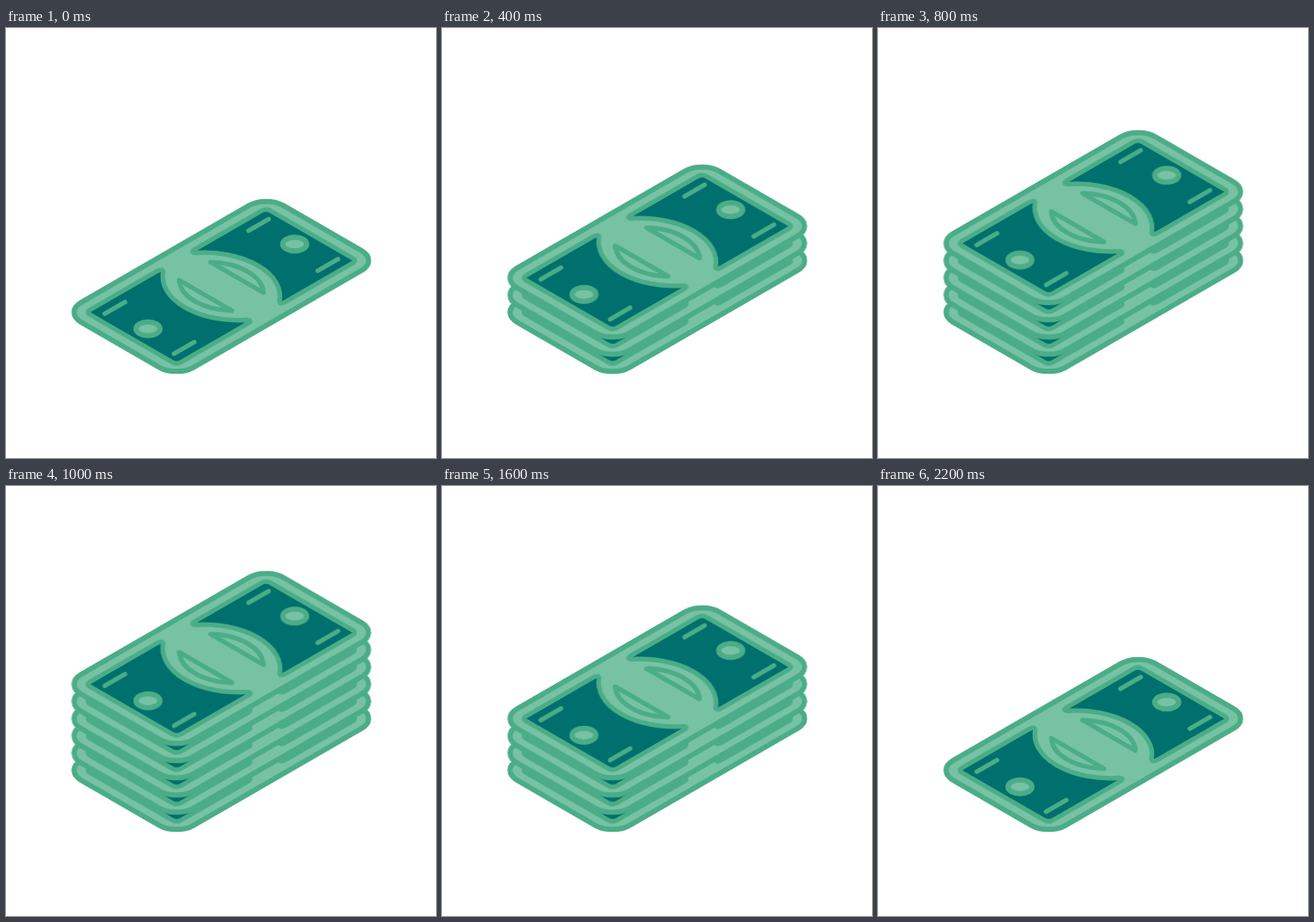
An HTML page for the animation above (2400 ms loop, 500 px wide and 500 px high).

```html
<!DOCTYPE html>
<html lang="en">
<head>
<meta charset="utf-8">
<title>Stack of bills</title>
<style>
  html, body { margin: 0; width: 100%; height: 100%; overflow: hidden; background: #fff; }
  svg { display: block; width: 500px; height: 500px; }
  .shape { stroke: #4bad87; stroke-width: 5.4px; stroke-linejoin: round; stroke-linecap: round; }
  .shape * { vector-effect: non-scaling-stroke; }
  .light { fill: #78c2a4; }
  .dark { fill: #00706e; }
  .edge, .coin { stroke-width: 6px; }
</style>
</head>
<body>
<svg viewBox="0 0 500 500">
  <defs>
    <!-- Flat coordinates around the bill's centre; the stage applies the isometric projection. -->
    <g id="half" class="shape">
      <path class="dark" d="M26 -61 H115 Q121 -61 121 -55 V55 Q121 61 115 61 H26
        Q18.5 61 21.5 56.5 A72 72 0 0 0 21.5 -56.5 Q18.5 -61 26 -61 Z"/>
      <path class="light" d="M21 -35.5 A52 52 0 0 1 21 35.5 Z"/>
      <circle class="light coin" cx="98.5" r="11.4"/>
      <path d="M83 -46.5 H110 M83 46.5 H110"/>
    </g>
    <g id="bill">
      <g class="shape">
        <rect class="light edge" x="-135.7" y="-75.5" width="271.4" height="151" rx="23"/>
      </g>
      <use href="#half"/>
      <use href="#half" transform="rotate(180)"/>
    </g>
  </defs>
  <g id="stack"></g>
</svg>
<script>
  const LOOP = 2400, STEP = 200, BILLS = 6, LIFT = 20;
  const stack = document.getElementById('stack');
  const cos = Math.cos(Math.PI / 6);

  for (let level = 0; level < BILLS; level++) {
    const bill = document.createElementNS('http://www.w3.org/2000/svg', 'use');
    bill.setAttribute('href', '#bill');
    bill.setAttribute('transform', `matrix(${cos} -0.5 ${cos} 0.5 250.4 ${300.5 - level * LIFT})`);
    stack.append(bill);
    if (level === 0) continue;

    // Each level appears one step later and leaves one step earlier than the one below.
    const shown = level * STEP / LOOP;
    bill.animate([
      { opacity: 0, offset: 0, easing: 'step-end' },
      { opacity: 1, offset: shown, easing: 'step-end' },
      { opacity: 0, offset: 1 - shown, easing: 'step-end' },
      { opacity: 0, offset: 1 }
    ], { duration: LOOP, iterations: Infinity });
  }
</script>
</body>
</html>
```
